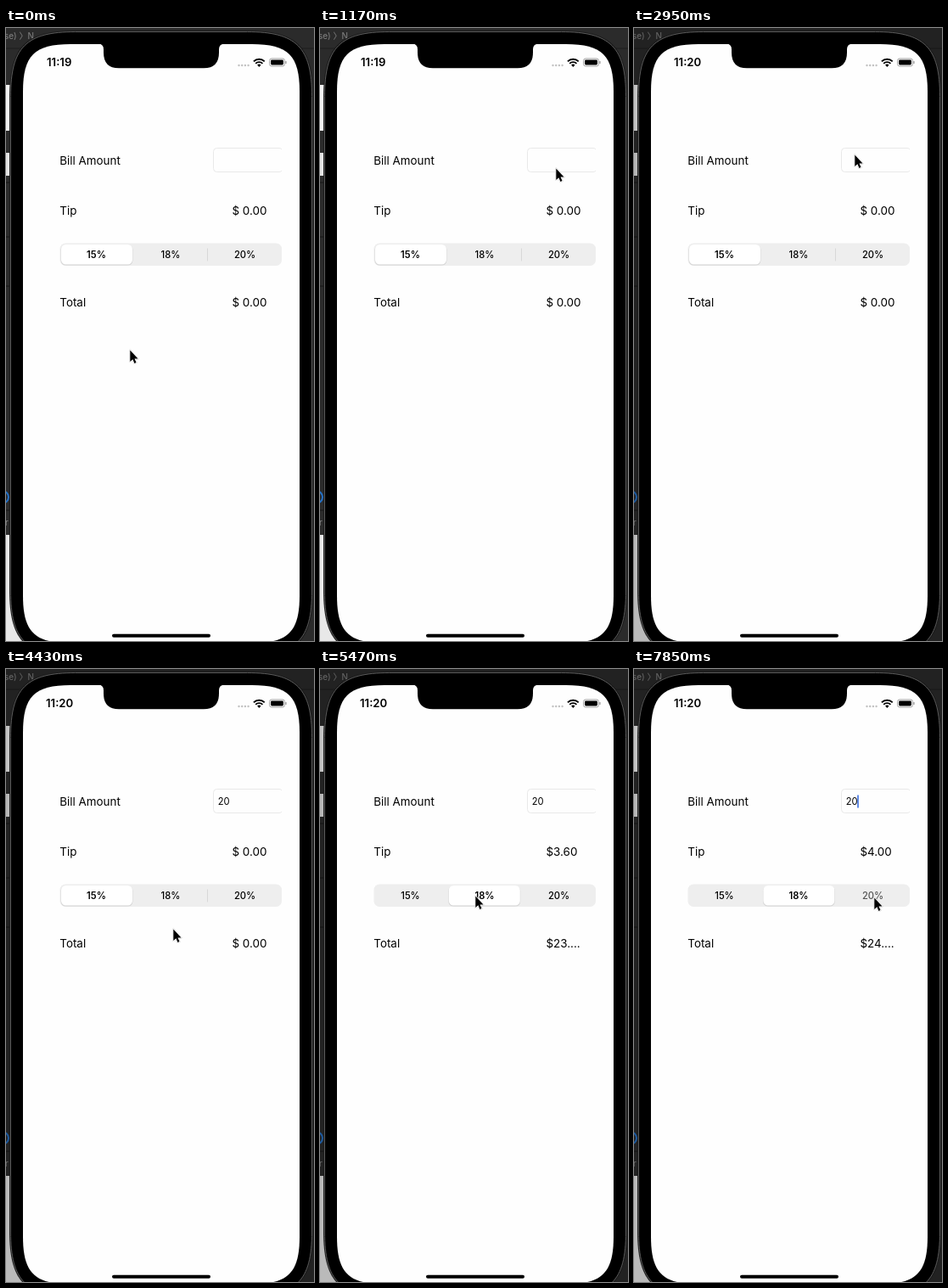
Animation, 363 px wide and 722 px high, one loop 8 s. Source, as an HTML page:

```html
<!DOCTYPE html>
<html lang="en">
<head>
<meta charset="utf-8">
<title>Tip calculator</title>
<style>
  html, body { margin: 0; width: 100%; height: 100%; overflow: hidden; background: #2b2b2b; }
  svg { display: block; width: 363px; height: 722px; font: 13.4px Inter, "Liberation Sans", sans-serif; }
  .segment { font-size: 11.2px; font-weight: 500; text-anchor: middle; }
  .segment .on { font-weight: 600; }
</style>
</head>
<body>
<svg viewBox="0 0 363 722">
  <!-- desktop behind the phone -->
  <rect width="363" height="722" fill="#2b2b2b"/>
  <path d="M0 24H363" stroke="#1c1c1c"/>
  <rect y="67" width="12" height="54" fill="#f4f4f4"/>
  <rect y="147" width="12" height="27" fill="#e4e4e4"/>
  <rect y="597" width="40" height="125" fill="#e8e8e8"/>
  <path d="M0 182H8M0 246H8M0 304H8M0 568H8" stroke="#151515"/>
  <circle cx="-4" cy="552.5" r="7" fill="none" stroke="#2471c8" stroke-width="2"/>
  <g fill="#858585" font-size="10">
    <text x="-2" y="13">se) 〉N</text>
    <text x="-1" y="586">r</text>
  </g>
  <rect id="shade" width="363" height="722"/>

  <!-- phone -->
  <path id="body" fill="#1b1b1b"/>
  <path id="rim" stroke="#5c5c5c"/>
  <path id="screen" fill="#fefefe"/>
  <path d="M109 18.5Q115 19 115 25V29Q115 47.3 133 47.3H233Q251 47.3 251 29V25Q251 19 257 18.5Z"/>
  <rect x="125" y="713.8" width="116" height="4" rx="2"/>

  <!-- status bar -->
  <text id="clock" y="45" font-size="13.2" font-weight="600"></text>
  <path d="M274.5 44H287" stroke="#c2c2c2" stroke-width="2.4" stroke-linecap="round" stroke-dasharray="0 3.7"/>
  <path d="M291.9 39.4A9 9 0 0 1 304.7 39.4M294.2 41.8A5.8 5.8 0 0 1 302.4 41.8" fill="none" stroke="#000" stroke-width="1.9"/>
  <path d="M298.3 46L296.1 43.6A3 3 0 0 1 300.5 43.6Z"/>
  <rect x="310.5" y="36" width="18" height="9" rx="2.6" fill="none" stroke="#9a9a9a" stroke-width=".9"/>
  <rect x="312" y="37.5" width="15" height="6" rx="1.4"/>
  <path d="M330 39V42" stroke="#9a9a9a" stroke-width="1.2"/>

  <!-- form -->
  <text x="63.3" y="161">Bill Amount</text>
  <text x="63.3" y="220">Tip</text>
  <text x="63.3" y="327.5">Total</text>
  <path d="M325 143Q324 141.5 322 141.5H248.5Q244.5 141.5 244.5 145.5V165.5Q244.5 169.5 248.5 169.5H322Q324 169.5 325 168" fill="none" stroke="#e9e9e9"/>
  <text id="bill" x="249.8" y="160" font-size="11.2"></text>
  <rect id="caret" y="148.5" width="1.6" height="15" fill="#3b6fe0"/>
  <text id="tip" x="266.5" y="220"></text>
  <text id="total" x="266.5" y="328"></text>

  <rect x="63.5" y="253.5" width="261.5" height="26.5" rx="6.5" fill="#eeeeee"/>
  <path id="divider" d="M237.5 259.5V274.5" stroke="#d8d8d8"/>
  <g id="pill">
    <rect x="-.4" y="255.4" width="84.8" height="24.2" rx="5.8" fill="#d2d2d2"/>
    <rect y="255" width="84" height="23.6" rx="5.5" fill="#fff"/>
  </g>
  <g class="segment">
    <text x="106.5" y="271">15%</text>
    <text x="194" y="271">18%</text>
    <text x="281.5" y="271">20%</text>
  </g>

  <g id="cursor" stroke-linejoin="round">
    <path id="arrow" d="M.8 1.5V15L3.9 12.2L5.9 17L8 16.1L6 11.5H10Z" stroke="#fff" stroke-width="1.8" paint-order="stroke"
      style="filter: drop-shadow(.3px .8px .7px #0006)"/>
  </g>
</svg>
<script>
const LOOP = 8000, TICK = 147.5;
const FOCUS = 14, KEYS = [22, 26], BLUR = 30, TAP_18 = 33, TAP_20 = 53;
const $ = id => document.getElementById(id);
const set = (id, name, value) => $(id).setAttribute(name, value);
const segments = document.querySelectorAll('.segment text');

const clamp = v => Math.min(1, Math.max(0, v));
const ease = (f, from, to) => {
  const p = clamp((f - from) / (to - from));
  return p * p * (3 - 2 * p);
};

// Rectangle with continuous corners; each bend reaches a along its sides.
function squircle(x, y, w, h, a) {
  const k = a * .24, r = x + w, b = y + h;
  return `M${x} ${y + a}C${x} ${y + k} ${x + k} ${y} ${x + a} ${y}H${r - a}` +
    `C${r - k} ${y} ${r} ${y + k} ${r} ${y + a}V${b - a}` +
    `C${r} ${b - k} ${r - k} ${b} ${r - a} ${b}H${x + a}` +
    `C${x + k} ${b} ${x} ${b - k} ${x} ${b - a}Z`;
}
set('body', 'd', squircle(4, 3, 358, 737.5, 78));
set('rim', 'd', squircle(5.5, 4.5, 355, 734.5, 76));
set('screen', 'd', squircle(20, 19, 326, 705.4, 56));

// Pointer moves: first tick, last tick, destination.
const home = [145.5, 378];
const moves = [
  [0, 1, 141, 352], [2, 8, 277.5, 164], [10, 11, 275, 158], [13, 15, 259.5, 148],
  [28, 30, 196.5, 305], [30, 33, 182.5, 266], [43, 44, 184.5, 270.5], [47, 52, 282.5, 268]
];
const pointer = f => moves.reduce(([x, y], [from, to, toX, toY]) => {
  const p = ease(f, from, to);
  return [x + (toX - x) * p, y + (toY - y) * p];
}, home);

// Solid for six ticks after an input, then a soft blink.
function caretAlpha(f) {
  if (f >= BLUR) return clamp(.8 + 1.6 * Math.cos(2 * Math.PI * (f - 41) / 6.6));
  return [FOCUS, ...KEYS].some(key => f >= key && f < key + 6) ? 1 : 0;
}

function money(value) {
  const text = '$' + value.toFixed(2);
  return text.length > 5 ? text.slice(0, 3) + '....' : text;
}

function draw(ms) {
  const f = Math.floor((ms + 20) / TICK);
  const bill = '20'.slice(0, KEYS.filter(key => f >= key).length);
  const rate = f < TAP_18 ? 0 : f < TAP_20 ? .18 : .2;
  const pill = 65 + 86.8 * ease(f, TAP_18, TAP_18 + 3) + 87 * ease(f, TAP_20 - .2, TAP_20 + 4);
  const late = f >= FOCUS;

  set('shade', 'opacity', f < 9 ? 0 : .2);
  $('clock').textContent = late ? '11:20' : '11:19';
  set('clock', 'x', late ? 47 : 48);
  $('bill').textContent = bill;
  $('tip').textContent = rate ? money(bill * rate) : '$ 0.00';
  $('total').textContent = rate ? money(bill * (1 + rate)) : '$ 0.00';
  set('caret', 'x', 249.8 + bill.length * 6.7);
  set('caret', 'opacity', caretAlpha(f));
  set('pill', 'transform', `translate(${pill} 0)`);
  set('divider', 'opacity', rate ? 0 : 1);
  const chosen = Math.round((pill - 65) / 87);
  segments.forEach((label, i) => label.setAttribute('class', i === chosen ? 'on' : ''));
  segments[2].setAttribute('fill', f >= TAP_20 ? '#555' : '#000');
  set('cursor', 'transform', `translate(${pointer(f).join(' ')})`);
}

const start = performance.now();
function tick() {
  draw((performance.now() - start) % LOOP);
  requestAnimationFrame(tick);
}
tick();
</script>
</body>
</html>
```
